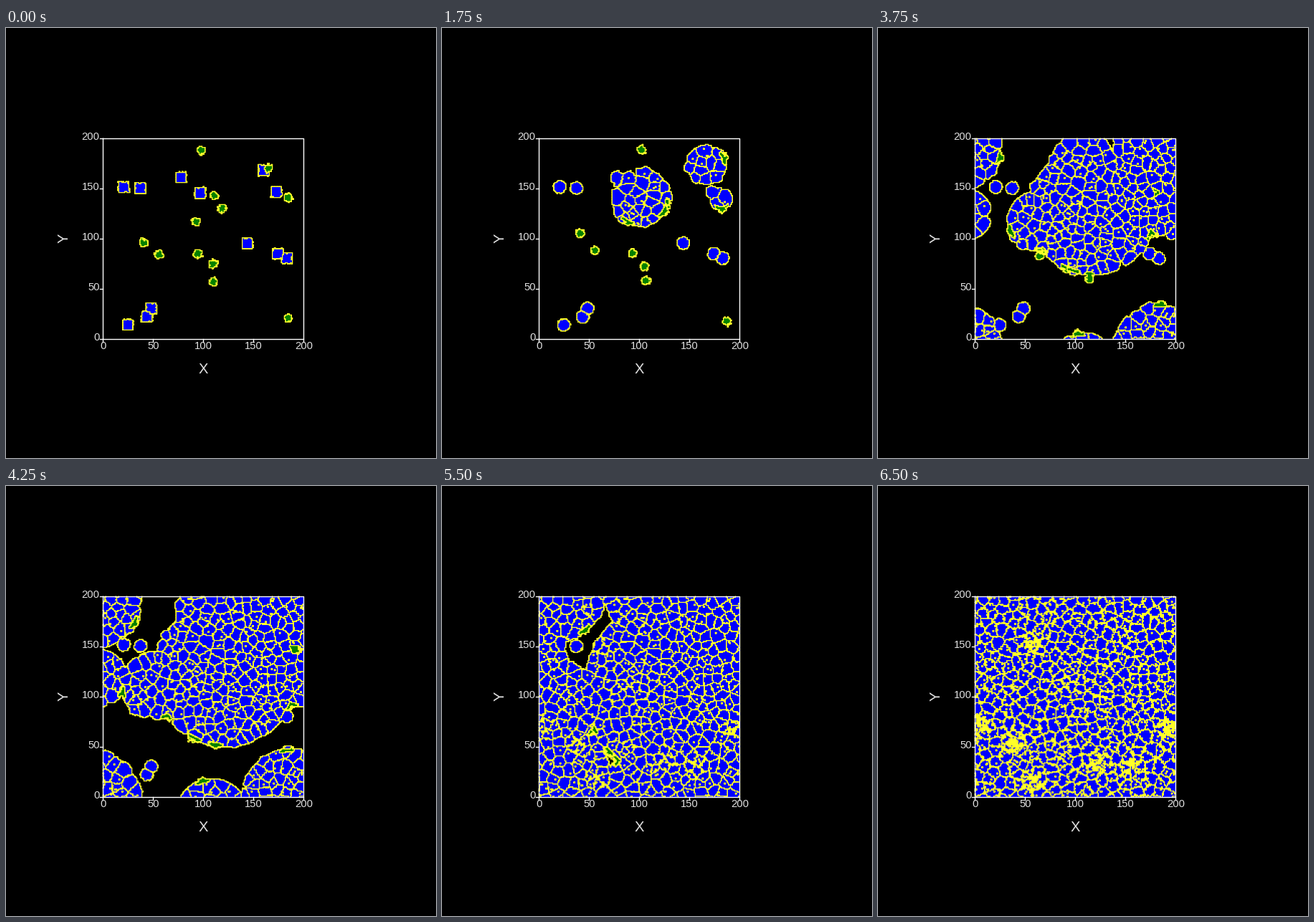
These frames come from a looping animation (600x600 px, 6750 ms). A matplotlib script:

```python
import numpy as np
import matplotlib.pyplot as plt
from matplotlib.animation import FuncAnimation

FRAMES, INTERVAL = 27, 250
N, SCALE = 200, 1.4          # lattice size, stage pixels per site
LEFT, TOP, BOTTOM = 135, 154, 434
RIGHT = LEFT + N * SCALE
YY, XX = np.mgrid[0:N, 0:N] + 0.5
DOT, GREEN = 900, 1000       # labels above the cell numbers

FOUNDERS = np.array([(21, 151.5), (37.5, 150.5), (78, 161), (97, 145.5),
                     (160.5, 168), (173, 146.5), (144, 95.5), (174.5, 85),
                     (183.5, 80.5), (48.5, 30.5), (44, 22.5), (25, 14)])
WALKERS = np.array([(98, 188), (165, 170), (111, 143), (119, 130), (93, 117),
                    (41, 96), (56, 84), (95, 85), (110, 75), (110, 57),
                    (185, 141), (185, 21)], float)

# Growing discs: centre, drift of the centre, radius, growth per frame.
LOBES = [((97, 145), (32, -28), -2, 4.4),
         ((163, 169), (32, 36), -2, 3.1),
         ((179, 144), (21, -32), -1, 1.75),
         ((100, 140), (-60, -36), 0, 2.0),
         ((105, 150), (5, 40), -1, 2.2)]

CROWDS = [(4, 71), (39, 54), (191, 66), (59, 14), (125, 33), (156, 33), (56, 153)]


def wrap(d):
    return (d + N / 2) % N - N / 2


def torus_distance(x0, y0, x, y):
    return np.hypot(wrap(x0 - x), wrap(y0 - y))


def tissue_field(frame):
    """Signed distance to the tissue edge, negative inside."""
    drift = (frame / 19) ** 2
    closing = 6 * max(0, frame - 22)
    return np.min([torus_distance(XX, YY, x + drift * dx, y + drift * dy)
                   - (radius + rate * frame + closing)
                   for (x, y), (dx, dy), radius, rate in LOBES], axis=0)


FIELDS = [tissue_field(f) for f in range(FRAMES)]


def site(p):
    return int(p[1]) % N, int(p[0]) % N


def walker_paths():
    """Random walks that the advancing tissue pushes ahead of its edge."""
    rng = np.random.default_rng(4)
    pos, paths = WALKERS.copy(), [WALKERS.copy()]
    for field in FIELDS[1:]:
        gy, gx = np.gradient(field)
        pos += rng.normal(0, 1.3, pos.shape)
        for p in pos:
            for _ in range(4):
                i = site(p)
                if field[i] < -2:
                    p += (-2 - field[i]) * np.array([gx[i], gy[i]])
        paths.append(pos.copy())
    return paths


PATHS = walker_paths()


def make_seeds(count=430, tries=10):
    """Evenly scattered points: keep the loneliest of several candidates."""
    rng = np.random.default_rng(8)
    pts = list(FOUNDERS)
    while len(pts) < count:
        new, old = rng.uniform(0, N, (tries, 2)), np.array(pts)
        gaps = torus_distance(new[:, :1], new[:, 1:], old[:, 0], old[:, 1]).min(1)
        pts.append(new[gaps.argmax()])
    return np.array(pts)


SEEDS = make_seeds()
FOUNDER_COUNT = len(FOUNDERS)
SEED_ROW, SEED_COL = SEEDS.astype(int).T[::-1] % N
dot_rng = np.random.default_rng(3)
DOTS = (SEEDS[:, None] + dot_rng.uniform(-4, 4, (len(SEEDS), 3, 2))).astype(int) % N
DOT_RANK = dot_rng.random((len(SEEDS), 3))


def roughness(frame):
    sigma = np.full((N, N), 0.28 + 0.32 * max(0, frame - 22) / 4)
    ramp = np.clip((frame - 18) / 8, 0, 1)
    for x, y in CROWDS:
        sigma += 2.2 * ramp * np.exp(-(torus_distance(XX, YY, x, y) / 9) ** 2)
    return sigma


def window(x, y, half):
    span = np.arange(-half, half + 1)
    return np.ix_((int(y) + span) % N, (int(x) + span) % N)


def cell_labels(frame):
    rng = np.random.default_rng(100 + frame)
    field, sigma = FIELDS[frame], roughness(frame)
    px = XX + sigma * rng.standard_normal((N, N))
    py = YY + sigma * rng.standard_normal((N, N))
    labels = np.full((N, N), -1)
    best = np.full((N, N), 9.5)
    active = (field[SEED_ROW, SEED_COL] < -1.5) & (frame > 0)
    active[:FOUNDER_COUNT] = True

    for i in np.flatnonzero(active):
        x, y = SEEDS[i]
        win = window(x, y, 11)
        dx, dy = wrap(px[win] - x), wrap(py[win] - y)
        dist = np.hypot(dx, dy)
        if frame == 0:
            allowed = np.maximum(abs(dx), abs(dy)) < 5.3
        else:
            allowed = (field[win] < 0) | (dist < (6.3 if i < FOUNDER_COUNT else 5))
        closer = allowed & (dist < best[win])
        best[win] = np.where(closer, dist, best[win])
        labels[win] = np.where(closer, i, labels[win])

    rate = np.interp(frame, [0, 7, 19, 26], [0, 0.2, 0.25, 0.4])
    for x, y in DOTS[active[:, None] & (DOT_RANK < rate)]:
        if labels[y, x] >= FOUNDER_COUNT and field[y, x] < -2:
            labels[y, x] = DOT

    for k, (x, y) in enumerate(PATHS[frame]):
        win = window(x, y, 10)
        dist = torus_distance(px[win], py[win], x, y) + rng.normal(0, 0.45, (21, 21))
        here, depth = labels[win], field[win]
        loose = (dist < 4.1) & ((here == -1) | (frame == 0))
        squeezed = (dist < 7) & (depth > -3.5) & (depth < 0) & (here >= FOUNDER_COUNT)
        labels[win] = np.where(loose | squeezed, GREEN + k, here)
    return labels


def outlines(labels):
    """Borders between unlike sites as one NaN-separated path."""
    gap = np.nan
    r, c = np.nonzero(labels[:, 1:] != labels[:, :-1])
    vx = np.stack([c + 1, c + 1, c * gap], 1).ravel()
    vy = np.stack([r, r + 1, r * gap], 1).ravel()
    r, c = np.nonzero(labels[1:] != labels[:-1])
    hx = np.stack([c, c + 1, c * gap], 1).ravel()
    hy = np.stack([r + 1, r + 1, r * gap], 1).ravel()
    return (LEFT + SCALE * np.concatenate([vx, hx]),
            BOTTOM - SCALE * np.concatenate([vy, hy]))


fig = plt.figure(figsize=(6, 6), dpi=100, facecolor="black")
ax = fig.add_axes([0, 0, 1, 1])
image = ax.imshow(np.zeros((N, N, 3), np.uint8), origin="lower",
                  extent=(LEFT, RIGHT, BOTTOM, TOP), interpolation="nearest")
edges, = ax.plot([], [], color="#ffff28", lw=0.8, solid_capstyle="projecting")
edges.set_snap(False)
ax.set(xlim=(0, 600), ylim=(600, 0), aspect="auto")
ax.axis("off")

line_style = dict(color="white", lw=1.0, zorder=5)
ax.plot([LEFT, RIGHT, RIGHT, LEFT, LEFT], [TOP, TOP, BOTTOM, BOTTOM, TOP], **line_style)
text_style = dict(color="#e0e0e0", family="Liberation Sans", va="center")
for value in range(0, 201, 50):
    x, y = LEFT + SCALE * value, BOTTOM - SCALE * value
    ax.plot([x, x], [BOTTOM, BOTTOM + 4], **line_style)
    ax.plot([LEFT - 4, LEFT], [y, y], **line_style)
    ax.text(x + 0.5, 444.5, str(value), ha="center", fontsize=10.6, **text_style)
    ax.text(130.5, y - 1.5, str(value), ha="right", fontsize=10.6, **text_style)
ax.text(275.5, 476, "X", ha="center", fontsize=14.5, **text_style)
ax.text(81, 293, "Y", ha="center", rotation=90, fontsize=14.5, **text_style)


def update(frame):
    labels = cell_labels(frame)
    rgb = np.zeros((N, N, 3), np.uint8)
    rgb[labels >= 0] = 0, 0, 255
    rgb[labels == DOT] = 255, 255, 40
    rgb[labels >= GREEN] = 0, 128, 0
    image.set_data(rgb)
    edges.set_data(*outlines(labels))
    return image, edges


anim = FuncAnimation(fig, update, frames=FRAMES, interval=INTERVAL,
                     repeat=True, repeat_delay=0, blit=False)
plt.show()
```
